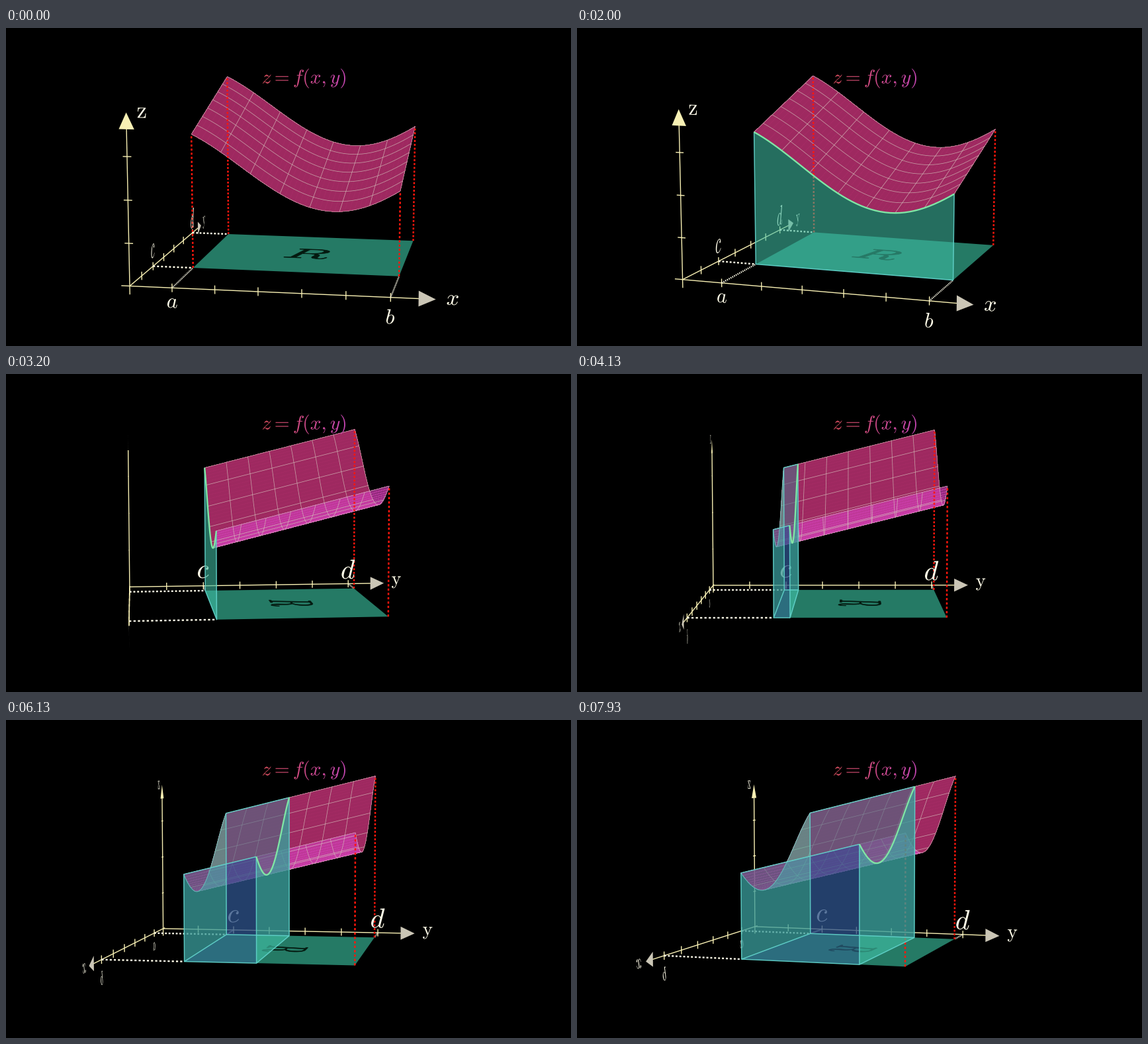
Animation of 854x480 px, one loop 8 s. Source, as a matplotlib script:

```python
import numpy as np
import matplotlib
import matplotlib.pyplot as plt
from matplotlib.animation import FuncAnimation
from matplotlib.collections import LineCollection, PolyCollection
from matplotlib.patches import PathPatch
from matplotlib.path import Path
from matplotlib.textpath import TextPath

matplotlib.rcParams["mathtext.fontset"] = "cm"

W, H, DPI = 854, 480, 64
FRAMES, STEP = 160, 50

# Camera
CENTER = np.array([3.0, 4.0, 1.7])
DIST, UNIT = 34.5, 60.0
RATE = 4.54                       # ambient turn, degrees per second
TURN_START, TURN_END = 2.033, 3.533
ANGLE_START, ANGLE_END = -80.1, -2.9

# Region and solid
A, B, C, D = 1.0, 6.0, 2.0, 6.0
GROW_TIME = 6.0

X, Y, Z = np.eye(3)


def rgb(r, g, b):
    return (r / 255, g / 255, b / 255)


CREAM = rgb(248, 240, 180)
GREY_TIP = rgb(203, 198, 182)
WHITE = rgb(255, 252, 232)
RED = rgb(255, 22, 12)
FLOOR = rgb(37, 122, 101)
PINK = rgb(164, 43, 100)
MAGENTA = rgb(205, 62, 175)
GRID = rgb(214, 200, 190)
TEAL = rgb(62, 185, 160)
BLUE = rgb(46, 82, 138)
CYAN = rgb(98, 212, 204)
LIME = rgb(128, 230, 165)


def surface(x, y):
    return 2.51 - 1.01 * np.sin(0.7 * (x - 2.2)) + 0.25 * (y - 2)


def smooth(u):
    sig = lambda s: 1 / (1 + np.exp(-s))
    lo = sig(-5)
    s = (sig(10 * (np.clip(u, 0, 1) - 0.5)) - lo) / (1 - 2 * lo)
    return float(np.clip(s, 0, 1))


class Camera:
    def __init__(self, t):
        turn = smooth((t - TURN_START) / (TURN_END - TURN_START))
        before = ANGLE_START + RATE * min(t, TURN_START)
        after = ANGLE_END + RATE * max(t - TURN_END, 0)
        th = np.radians(before + (after - before) * turn)
        ph = np.radians(80 + 5 * turn)
        ct, st, cp, sp = np.cos(th), np.sin(th), np.cos(ph), np.sin(ph)
        self.right = np.array([-st, ct, 0])
        self.up = np.array([-cp * ct, -cp * st, sp])
        self.out = np.array([sp * ct, sp * st, cp])
        self.eye = CENTER + DIST * self.out

    def __call__(self, pts):
        q = np.asarray(pts, float) - CENTER
        k = UNIT * DIST / (DIST - q @ self.out)
        return np.stack([W / 2 + k * (q @ self.right),
                         H / 2 - k * (q @ self.up)], axis=-1)


def glyph(tex, em):
    path = TextPath((0, 0), tex, size=100)
    v = path.vertices
    ink = v[path.codes != Path.CLOSEPOLY]
    mid = (ink.min(0) + ink.max(0)) / 2
    return (v - mid) * em / 100, path.codes


# text, em, centre, direction of the text line, upward direction
LABELS = [(glyph(tex, em), np.array(pos), e1, Z) for tex, em, pos, e1 in [
    ("$a$", 0.50, (A, 0, -0.36), X),
    ("$b$", 0.48, (B, 0, -0.44), X),
    ("$x$", 0.50, (7.37, 0, 0), X),
    (r"$\mathrm{z}$", 0.53, (0.36, 0, 4.0), X),
    ("$c$", 0.76, (0, C, 0.38), Y),
    ("$d$", 0.76, (0, D, 0.40), Y),
    (r"$\mathrm{y}$", 0.52, (0, 7.35, 0.02), Y),
]]
REGION_NAME = (glyph("$R$", 1.5), np.array([3.5, 4.0, 0]), X, Y)

fig = plt.figure(figsize=(W / DPI, H / DPI), dpi=DPI, facecolor="black")
ax = fig.add_axes([0, 0, 1, 1])
ax.set_xlim(0, W)
ax.set_ylim(H, 0)
ax.axis("off")


def add_title():
    path = TextPath((0, 0), "$z = f(x, y)$", size=29.5)
    v = path.vertices * [1, -1]
    ink = v[path.codes != Path.CLOSEPOLY]
    v = v + [388 - ink[:, 0].min(), 83.5]
    u = np.linspace(0, 1, 140)[:, None]
    ramp = (1 - u) * rgb(214, 78, 92) + u * np.array(rgb(196, 70, 190))
    img = ax.imshow(ramp[None], extent=(387, 529, 100, 50), aspect="auto",
                    zorder=100)
    img.set_clip_path(Path(v, path.codes), ax.transData)
    ax.set_xlim(0, W)
    ax.set_ylim(H, 0)


add_title()
shown = []


def put(artist, collection=True):
    artist.set_zorder(len(shown) + 1)
    (ax.add_collection if collection else ax.add_patch)(artist)
    shown.append(artist)


def lines(segs, color, width, alpha=1.0):
    put(LineCollection(segs, colors=[color], linewidths=width * 72 / DPI,
                       alpha=alpha))


def fill(polys, colors, alpha=1.0, smooth_edge=True):
    put(PolyCollection(polys, facecolors=colors, edgecolors="none",
                       alpha=alpha, antialiaseds=smooth_edge))


def text(cam, label, color, stroke=0.0):
    (verts, codes), pos, e1, e2 = label
    pts = pos + verts[:, :1] * e1 + verts[:, 1:] * e2
    put(PathPatch(Path(cam(pts), codes), facecolor=color, edgecolor=color,
                  linewidth=stroke), collection=False)


def dots(cam, p, q, period=0.1):
    p, q = np.array(p, float), np.array(q, float)
    n = max(2, round(np.linalg.norm(q - p) / period))
    return [cam([p + (q - p) * i / n, p + (q - p) * (i + 0.5) / n])
            for i in range(n)]


def draw_axes(cam):
    segs = [cam([-0.2 * X, 6.7 * X]), cam([0 * Y, 6.7 * Y]),
            cam([-0.2 * Z, 3.7 * Z])]
    for axis, across, count in ((X, Z, 6), (Y, Z, 6), (Z, X, 3)):
        segs += [cam([i * axis - 0.1 * across, i * axis + 0.1 * across])
                 for i in range(1, count + 1)]
    lines(segs, CREAM, 1.4)
    tips = [cam([end * axis, (end - 0.38) * axis + 0.18 * across,
                 (end - 0.38) * axis - 0.18 * across])
            for axis, across, end in ((X, Z, 7), (Y, Z, 7), (Z, X, 4))]
    fill(tips, [GREY_TIP, GREY_TIP, CREAM])


def draw_floor(cam):
    fill([cam([(A, C, 0), (B, C, 0), (B, D, 0), (A, D, 0)])], [FLOOR])
    text(cam, REGION_NAME, rgb(4, 26, 16), 0.8)
    segs = []
    for p, q in (((0, C, 0), (A, C, 0)), ((0, D, 0), (A, D, 0)),
                 ((A, 0, 0), (A, C, 0)), ((B, 0, 0), (B, C, 0))):
        segs += dots(cam, p, q)
    lines(segs, WHITE, 2.4)


def draw_surface(cam):
    xs = np.linspace(A, B, 43)
    polys, colors = [], []
    for x0, x1 in zip(xs[:-1], xs[1:]):
        polys.append(cam([(x, y, surface(x, y)) for x, y in
                          ((x0, C), (x1, C), (x1, D), (x0, D))]))
        xm = (x0 + x1) / 2
        slope = -0.707 * np.cos(0.7 * (xm - 2.2))
        view = cam.eye - np.array([xm, 4, surface(xm, 4)])
        front = np.array([-slope, -0.25, 1]) @ view > 0
        colors.append(PINK + (0.97,) if front else MAGENTA + (0.72,))
    fill(polys, colors, None, False)
    segs = [cam(top_curve(y)) for y in np.linspace(C, D, 8)]
    segs += [cam([(x, C, surface(x, C)), (x, D, surface(x, D))])
             for x in np.linspace(A, B, 8)]
    lines(segs, GRID, 0.8, 0.7)


def top_curve(y):
    xs = np.linspace(A, B, 43)
    return np.stack([xs, np.full_like(xs, y), surface(xs, y)], axis=1)


def wall(cam, y):
    return cam(np.vstack([top_curve(y), [(B, y, 0), (A, y, 0)]]))


def side(cam, x, w):
    return cam([(x, C, 0), (x, w, 0), (x, w, surface(x, w)),
                (x, C, surface(x, C))])


def frame_edges(cam, y):
    return [cam([(A, y, surface(A, y)), (A, y, 0), (B, y, 0),
                 (B, y, surface(B, y))])]


def draw_solid(cam, w, show):
    if show <= 0:
        return
    edges = frame_edges(cam, w)
    if w > C:
        back = min(1, (w - C) / 0.4)
        fill([cam([(A, C, 0), (B, C, 0), (B, w, 0), (A, w, 0)])], [TEAL], 0.25)
        fill([side(cam, A, w)], [BLUE], 0.55)
        fill([side(cam, B, w)], [BLUE], 0.5)
        top = np.vstack([top_curve(C), top_curve(w)[::-1]])
        fill([cam(top)], [rgb(165, 160, 120)], 0.2)
        fill([wall(cam, C)], [TEAL], 0.55 * back)
        lines([cam(top_curve(C))], CYAN, 1.0, 0.6)
        edges += frame_edges(cam, C)
        for x in (A, B):
            edges += [cam([(x, C, 0), (x, w, 0)]),
                      cam([(x, C, surface(x, C)), (x, w, surface(x, w))])]
    fill([wall(cam, w)], [TEAL], 0.6 * show)
    lines(edges, CYAN, 1.5, 0.9 * show)
    lines([cam(top_curve(w))], LIME, 2.3, show)


def draw(i):
    while shown:
        shown.pop().remove()
    t = i * STEP / 1000
    cam = Camera(t)
    show = smooth((t - 0.5) / 1.0)
    w = C + (D - C) * max(0, (t - TURN_END) / GROW_TIME)

    draw_axes(cam)
    draw_floor(cam)
    draw_surface(cam)
    for y, alpha in ((D, 1), (C, 1 - show)):
        segs = []
        for x in (A, B):
            segs += dots(cam, (x, y, 0), (x, y, surface(x, y)))
        lines(segs, RED, 2.5, alpha)
    for label in LABELS:
        text(cam, label, WHITE)
    draw_solid(cam, w, show)
    return shown


anim = FuncAnimation(fig, draw, frames=FRAMES, interval=STEP, repeat=True,
                     repeat_delay=0, blit=False)
plt.show()
```
